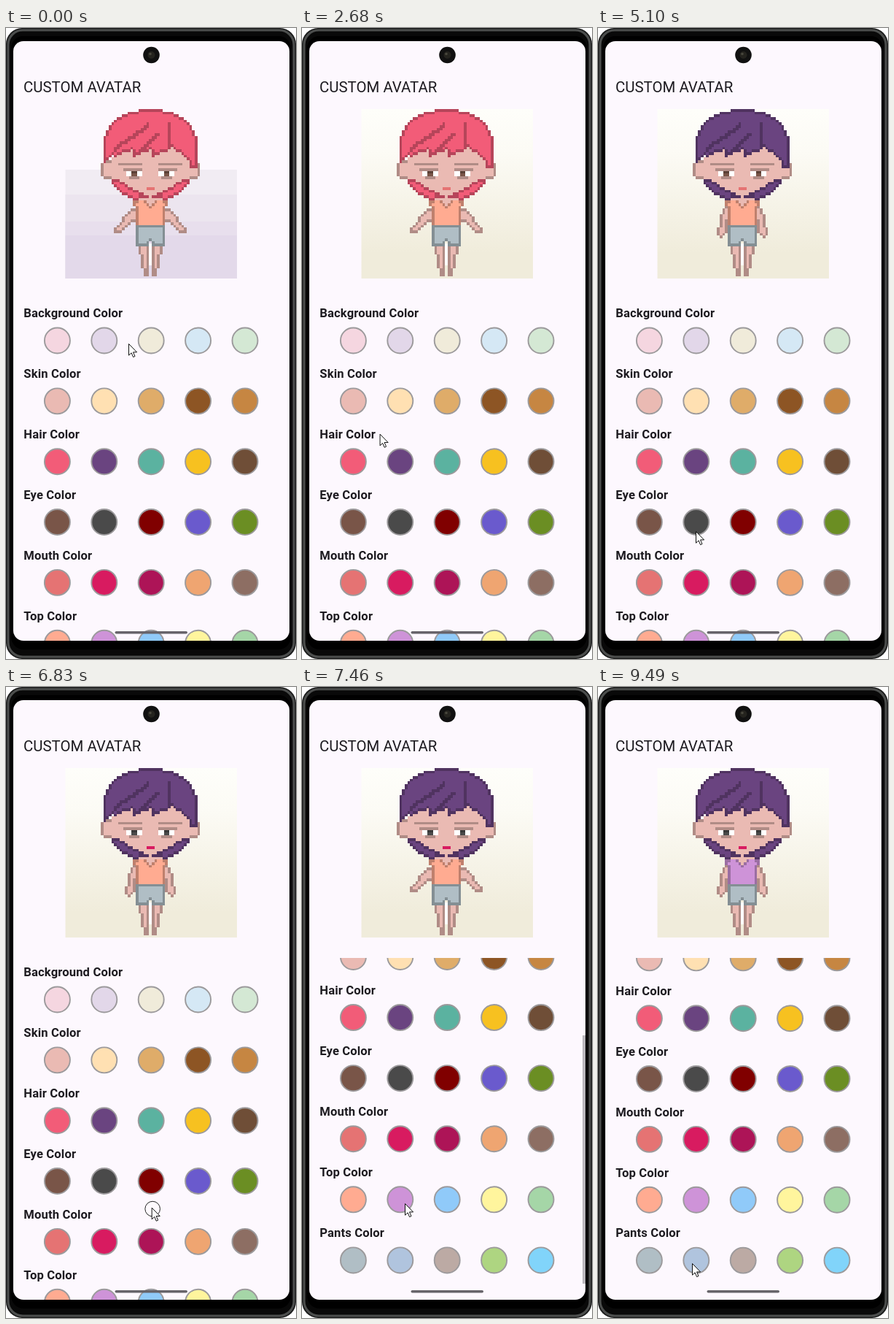
An HTML page for the animation above (9510 ms loop, 398 by 864 pixels).

```html
<!DOCTYPE html>
<html lang="en">
<head>
<meta charset="utf-8">
<title>Custom avatar</title>
<style>
  html, body { margin: 0; width: 100%; height: 100%; overflow: hidden; background: #fff; }
  svg { display: block; width: 398px; height: 864px; font-family: Roboto, sans-serif; fill: #1d1b20; }
  .label { font-size: 16.6px; font-weight: 700; letter-spacing: .14px; }
</style>
</head>
<body>
<svg id="stage" viewBox="0 0 398 864" xmlns="http://www.w3.org/2000/svg">
  <defs>
    <clipPath id="screenClip"><rect x="10" y="18" width="379" height="821" rx="14"/></clipPath>
    <clipPath id="listClip"><rect x="10" y="371" width="379" height="468"/></clipPath>
    <linearGradient id="cream" x1="0" y1="0" x2="0" y2="1">
      <stop offset="0" stop-color="#fefefa"/>
      <stop offset=".25" stop-color="#fcfbf5"/>
      <stop offset=".85" stop-color="#f0ecdb"/>
    </linearGradient>
  </defs>

  <rect width="398" height="864" rx="22" fill="#1a1b1b"/>
  <rect x="3" y="3" width="392" height="858" rx="20" fill="#090909" stroke="#4c4e4d" stroke-width="3"/>
  <rect x="7" y="11" width="384" height="840" rx="17" fill="#000"/>

  <g clip-path="url(#screenClip)">
    <rect x="10" y="18" width="379" height="821" fill="#fdf8fe"/>
    <circle cx="199.5" cy="37" r="11.3" fill="#111"/>
    <circle cx="199.5" cy="37" r="5" fill="#24231e"/>
    <circle cx="198" cy="35.5" r="1.8" fill="#47463c"/>
    <text x="24" y="88" font-size="20.4">CUSTOM AVATAR</text>

    <g id="lavender">
      <rect x="81.5" y="194" width="235.5" height="149" fill="#f1ecf3"/>
      <rect x="81.5" y="228" width="235.5" height="115" fill="#ece5ef"/>
      <rect x="81.5" y="265" width="235.5" height="78" fill="#e8dfed"/>
      <rect x="81.5" y="284" width="235.5" height="59" fill="#e3d9ea"/>
    </g>
    <rect id="creamBack" x="81.5" y="111" width="235.5" height="232" fill="url(#cream)"/>
    <g id="avatar" transform="translate(82 107.3) scale(3.6875)" shape-rendering="crispEdges"></g>

    <g clip-path="url(#listClip)"><g id="list"></g></g>
    <rect id="thumb" x="385" width="4" height="340" fill="#bbb8bd"/>
    <rect x="149.5" y="826" width="99.5" height="3.6" rx="1.8" fill="#67646a"/>
  </g>

  <g id="cursor">
    <circle id="press" cx="1.5" cy="2" r="10.3" fill="#fff" fill-opacity=".35" stroke="#222"/>
    <path d="M.5.5V16.2L4.1 12.8 6.6 18.6 9 17.5 6.5 11.9H11.6Z" fill="#fff" stroke="#111" stroke-linejoin="round"/>
  </g>
</svg>
<script>
const LOOP = 9510;
const MAX_SCROLL = 140;
const LIST_END = 839;
const $ = id => document.getElementById(id);
const clamp = (v, lo = 0, hi = 1) => Math.min(hi, Math.max(lo, v));
const lerp = (a, b, p) => a + (b - a) * p;
const ramp = (t, from, to) => clamp((t - from) / (to - from));
const show = (node, on) => { node.style.display = on ? "" : "none"; };

function add(parent, name, attrs = {}, text = "") {
  const node = document.createElementNS("http://www.w3.org/2000/svg", name);
  for (const key in attrs) node.setAttribute(key, attrs[key]);
  if (text) node.textContent = text;
  parent.appendChild(node);
  return node;
}

/* ---- colour list ---- */
const palette = {
  Background: "#f5d6e0 #e2d7e9 #f0ebda #d5e8f5 #d4e8d4",
  Skin: "#eabab3 #ffe0b2 #dfac69 #8d5524 #c68642",
  Hair: "#f25c78 #6a4480 #5bb2a0 #f7c120 #6f4e37",
  Eye: "#795548 #4a4a4a #800000 #6a5acd #6b8e23",
  Mouth: "#e57373 #d81b60 #ad1457 #efa571 #8d6e63",
  Top: "#ffab91 #ce93d8 #90caf9 #fff59d #a5d6a7",
  Pants: "#b0bec5 #b0c4de #bcaaa4 #aed581 #81d4fa",
};
Object.keys(palette).forEach((name, row) => {
  const y = row * 82.85;
  palette[name] = palette[name].split(" ");
  add($("list"), "text", { x: 24.3, y: 396.3 + y, class: "label" }, name + " Color");
  palette[name].forEach((fill, column) => add($("list"), "circle", {
    cx: 70.4 + column * 64.4, cy: 428 + y, r: 17.5, fill, stroke: "#9c9a9c", "stroke-width": 1.9,
  }));
});

/* ---- pixel figure: rules tested on a 64 x 64 grid, d = distance from the middle ---- */
const GRID = 64, MIDDLE = 31.5;
const avatar = $("avatar");
const cell = (x, y, w = 1, h = 1) => `M${x} ${y}h${w}v${h}h${-w}z`;
const paint = (d, color, parent = avatar) => add(parent, "path", { d, fill: `var(--${color})` });

// Paints the cells that satisfy a rule, with a darker rim.
function shape(color, rule, { parent = avatar, rim = true } = {}) {
  const full = (x, y) => rule(Math.abs(x + .5 - MIDDLE), y + .5, x + .5);
  let body = "", edge = "";
  for (let y = 0; y < GRID; y++) for (let x = 0; x < GRID; x++) {
    if (!full(x, y)) continue;
    const core = full(x - 1, y) && full(x + 1, y) && full(x, y - 1) && full(x, y + 1);
    if (core || !rim) body += cell(x, y); else edge += cell(x, y);
  }
  paint(body, color, parent);
  paint(edge, color + "Dark", parent);
}

const ellipse = (x, y, cx, cy, rx, ry) => ((x - cx) / rx) ** 2 + ((y - cy) / ry) ** 2 < 1;

// A capsule from (x1, y1) to (x2, y2) whose radius goes from r1 to r2.
function limb(x, y, x1, y1, r1, x2, y2, r2) {
  const dx = x2 - x1, dy = y2 - y1;
  const p = clamp(((x - x1) * dx + (y - y1) * dy) / (dx * dx + dy * dy));
  return Math.hypot(x - x1 - dx * p, y - y1 - dy * p) < lerp(r1, r2, p);
}

// The same block on both sides, near edge and width measured from the middle.
const both = (near, y, w, h, color) =>
  paint(cell(MIDDLE - near - w, y, w, h) + cell(MIDDLE + near, y, w, h), color);

paint(cell(31, 51, 1, 8), "white");
shape("Skin", (d, y) => d > .5 && y > 51 && limb(d, y, 2.5, 51, 2.1, 1.6, 62, 1.1));
const armsOut = add(avatar, "g");
const armsDown = add(avatar, "g");
shape("Skin", (d, y) => limb(d, y, 5.5, 39.5, 2, 11.8, 45.6, 1.5), { parent: armsOut });
shape("Skin", (d, y) => limb(d, y, 6, 39, 1.6, 7.8, 47, 1.7), { parent: armsDown });
paint(cell(29, 34, 5, 2), "SkinDark");
paint(cell(30, 35, 3, 2), "Skin");
shape("Top", (d, y) => y < 45 && d < (y < 37.5 ? 6.5 : 5.5) &&
  y > 34 + (d - 3.5) * .35 && d > (36.6 - y) * 1.4);
shape("Pants", (d, y) => d < 5.5 && y > 44 && y < 52 && (d > .5 || y < 50));

shape("Skin", (d, y) => ellipse(d, y, 16, 23.5, 2.6, 3.8));
shape("Skin", (d, y) => d < 15 && y > 13 && ellipse(d, y, 0, 24, 15.5, 11), { rim: false });
shape("Hair", (d, y) => y > 27 && y < 35 && ellipse(d, y, 0, 24, 15.2, 11.6) &&
  d > 12.5 - 1.8 * (y - 27) && (d > 4 || y < 34));

both(3, 21, 9, 1, "SkinDark");
both(3, 23, 7, 1, "SkinDark");
both(3.5 - .5, 24, 6, 2, "white");
both(5, 24, 2, 2, "Eye");
both(5, 24, 2, 1, "EyeDark");
both(4, 26, 4, 1, "SkinDark");
paint(cell(30, 30, 3, 1), "Mouth");

// Slanted teeth on the left, one sweep down to the right.
function fringe(x) {
  if (x > 39) return x > 46 ? 22.6 : 14.5 + (x - 39) * .85;
  const tooth = ((x + 3) / 7) % 1;
  return Math.max(21.5 - (x - 14) * .9, 19.2 - 3.4 * tooth);
}
shape("Hair", (d, y, x) => d < 17.5 && y < fringe(x) && (y > 14 || ellipse(d, y, 0, 14, 17.6, 13)));
const strand = (...ends) => shape("HairDark", (d, y, x) => {
  const [x1, y1, x2, y2] = ends;
  return limb(x, y, x1, y1, .7, x2, y2, .7);
}, { rim: false });
strand(31, 7, 18, 16);
strand(35, 10, 27, 17);
strand(38.5, 7, 38.5, 15);

/* ---- timeline ---- */
const shade = hex => "#" + hex.slice(1).match(/../g)
  .map(v => Math.round(parseInt(v, 16) * .75).toString(16).padStart(2, "0")).join("");

function setColor(name, hex) {
  avatar.style.setProperty("--" + name, hex);
  avatar.style.setProperty("--" + name + "Dark", shade(hex));
}
avatar.style.setProperty("--white", "#fff");

// When each part switches to its second colour, and back.
const switches = {
  Skin: [1430, 2400], Hair: [3520], Eye: [5530], Mouth: [6450], Top: [7730], Pants: [],
};
const drag = { from: 6700, to: 7100 };

// Places where the pointer rests.
const stops = [
  { from: 0, to: 130, x: 168, y: 432 },
  { from: 450, to: 700, x: 199, y: 432 },
  { from: 1300, to: 1750, x: 138, y: 515 },
  { from: 2200, to: 2300, x: 78, y: 519 },
  { from: 3100, to: 3500, x: 138, y: 596 },
  { from: 4700, to: 4700, x: 128, y: 724 },
  { from: 5100, to: 5530, x: 134, y: 689 },
  { from: 6180, to: 6450, x: 140, y: 765 },
  { from: 6680, to: drag.from, x: 200, y: 765 },
  { from: drag.to, to: drag.to, x: 199, y: 605 },
  { from: 7460, to: 7700, x: 141, y: 707 },
  { from: 8900, to: 8900, x: 58, y: 790 },
  { from: 9480, to: LOOP, x: 129, y: 789 },
];

function pointerAt(t) {
  const i = stops.findIndex(stop => stop.to > t);
  const next = stops[i], last = stops[i - 1] || next;
  const p = t >= next.from ? 1 : ramp(t, last.to, next.from);
  return [lerp(last.x, next.x, p), lerp(last.y, next.y, p)];
}

function draw(t) {
  show($("lavender"), t < 650);
  show($("creamBack"), t >= 650);
  for (const name in switches) {
    const count = switches[name].filter(time => t >= time).length;
    setColor(name, palette[name][count % 2]);
  }

  const down = (t + 820) % 1400 < 700;
  show(armsDown, down);
  show(armsOut, !down);

  // The list stretches slightly against its lower end before it settles.
  const scrolled = ramp(t, 6870, drag.to);
  const stretch = 1 + .003 * scrolled * (1 - ramp(t, 7500, 7700));
  $("list").setAttribute("transform",
    `translate(0 ${LIST_END * (1 - stretch) - MAX_SCROLL * scrolled * stretch}) scale(1 ${stretch})`);
  $("thumb").setAttribute("y", 371 + 106 * scrolled);
  $("thumb").setAttribute("opacity", ramp(t, 6880, 6950) * (1 - ramp(t, 7640, 7950)));

  $("cursor").setAttribute("transform", `translate(${pointerAt(t)})`);
  show($("press"), t >= drag.from && t < drag.to);
}

const start = performance.now();
function tick() {
  draw((performance.now() - start) % LOOP);
  requestAnimationFrame(tick);
}
tick();
</script>
</body>
</html>
```
